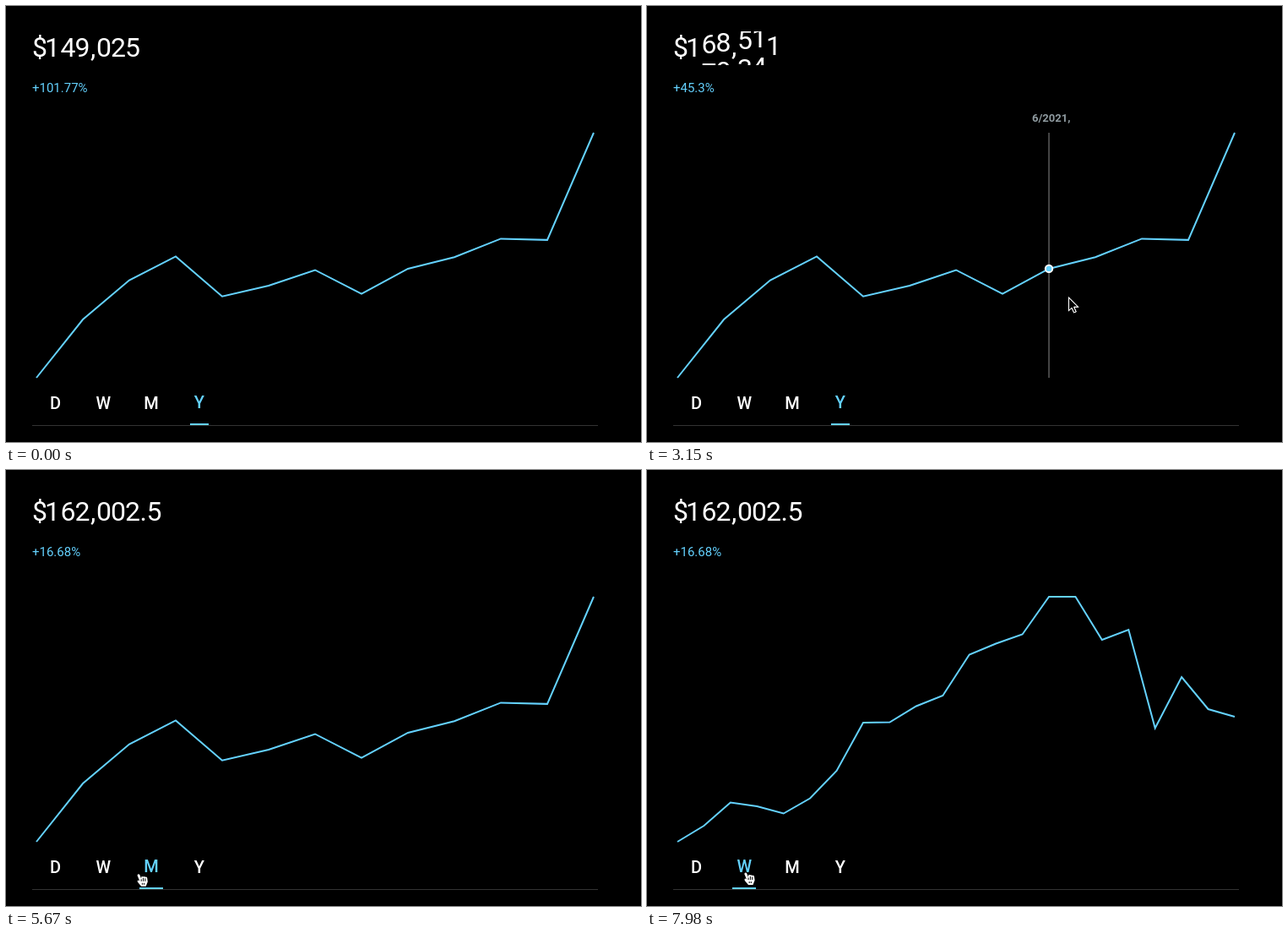
Animation, 752 px wide and 516 px high, one loop 8 s. Source, as an HTML page with a canvas:

```html
<!DOCTYPE html>
<html lang="en">
<head>
<meta charset="utf-8">
<title>Portfolio chart</title>
<style>
  html, body { margin: 0; height: 100%; overflow: hidden; background: #000; }
  canvas { display: block; }
</style>
</head>
<body>
<canvas id="stage" width="752" height="516"></canvas>
<script>
const ctx = document.getElementById('stage').getContext('2d');
const LOOP = 8000, TICK = 70;
const CYAN = '#64d2ff', WHITE = '#fff', FONT = 'Roboto, sans-serif';
const LEFT = 36, WIDTH = 660, TOP = 150, BOTTOM = 440;
const TOTAL_GAIN = 101.77, MONTH_GAIN = 16.68;
const DIGIT = 17, MARK = 8.5, ROW_HEIGHT = 34, BASELINE = 60;
const MORPH_START = 5670, MORPH_TIME = 1500;

// Chart data: yearly gains in percent from October 2020, monthly values in pixels
const yearGains = [0, 24.2, 40.5, 50.4, 33.8, 38.25, 44.75, 34.89, 45.3, 50.1, 57.75, 57.25, TOTAL_GAIN];
const monthHeights = [0, 19, 46.5, 42, 33.5, 51.5, 84, 141, 141.5, 160.5, 173,
  221.5, 234.5, 245.5, 290, 290, 239, 251, 134.5, 195, 157, 148];

const toPoints = heights => heights.map((h, i) =>
  [LEFT + WIDTH * i / (heights.length - 1), BOTTOM - h]);
const yearPoints = toPoints(yearGains.map(g => g / TOTAL_GAIN * (BOTTOM - TOP)));
const monthPoints = toPoints(monthHeights);

// The amount scrolls through these rows; rows without text get random digits
const rowTexts = {
  0: '49,025', 4: '29,920', 5: '20,118', 10: '02,102', 11: '12,400',
  13: '60,102.2', 14: '62,425.0', 15: '62,002.5'
};
// time, row, which of every three columns runs ahead
const rollKeys = [[1540, 0], [2450, 4, 1], [3850, 10, 0], [4620, 13, 1], [4830, 15]];

// time, x, y
const cursorKeys = [
  [770, 123, 39], [1400, 410, 443], [1540, 410, 443], [1680, 468, 455], [2450, 201, 313],
  [3185, 501, 345], [3850, 444, 337], [4480, 167, 476], [5110, 167, 476], [5460, 155, 478],
  [6510, 157, 476], [6860, 157, 476], [7350, 115, 476]
];

const arrow = new Path2D('M.5 .5V15.5L4 12.3L6.6 18L9 17L6.5 11.3H11.3Z');
const hand = new Path2D('M.3 2Q1.2-.3 3 1L5 6V3.8Q6.2 2.5 7.3 3.6Q8.5 2.6 9.6 4Q11.3 3.3 12 5L12.6 9.5L10.5 15H5L1 10.3Q-.3 8 1.7 7.6L3 8.5Z');
const fingers = new Path2D('M5 6.5V9M7.4 5V9M9.7 5.5V9M6.2 11V13M8.3 11V13');

const mix = (a, b, p) => a + (b - a) * p;
const linear = p => p;
const smooth = p => p * p * (3 - 2 * p);
const random = seed => Math.abs(Math.sin(seed * 127.1) * 43758.5) % 1;

function track(keys, t, easing) {
  const next = keys.findIndex(key => key[0] > t);
  if (next === 0) return keys[0].slice(1);
  if (next < 0) return keys[keys.length - 1].slice(1);
  const a = keys[next - 1], b = keys[next];
  const p = easing((t - a[0]) / (b[0] - a[0]));
  return a.slice(1).map((v, i) => mix(v, b[i + 1], p));
}

// CSS "ease": cubic-bezier(.25, .1, .25, 1)
function ease(x) {
  if (x <= 0) return 0;
  if (x >= 1) return 1;
  const bezier = (s, a, b) => 3 * (1 - s) ** 2 * s * a + 3 * (1 - s) * s * s * b + s ** 3;
  let low = 0, high = 1;
  for (let i = 0; i < 24; i++) {
    const mid = (low + high) / 2;
    if (bezier(mid, .25, .25) < x) low = mid; else high = mid;
  }
  return bezier(low, .1, 1);
}

function text(value, x, y, font, color, align = 'left') {
  ctx.font = `${font} ${FONT}`;
  ctx.fillStyle = color;
  ctx.textAlign = align;
  ctx.fillText(value, x, y);
}

function box(x, y, w, h, color) {
  ctx.fillStyle = color;
  ctx.fillRect(x, y, w, h);
}

function rowChar(row, column) {
  if (rowTexts[row]) return rowTexts[row][column] || '';
  if (column > 5) return '';
  return column === 2 ? ',' : String(Math.floor(random(row * 8 + column) * 10));
}

function rollPosition(t, column) {
  const lead = ahead => ahead === undefined ? 0
    : column % 3 === ahead ? Math.min(.6, .2 + column * .1) : .05;
  return track(rollKeys.map(([time, row, ahead]) => [time, row + lead(ahead)]), t, linear)[0];
}

function drawAmount(t) {
  const glyph = (char, x, y) => text(char, x, y, '400 32px', WHITE, 'center');
  glyph('$', 40, BASELINE);
  glyph('1', 55, BASELINE);
  ctx.save();
  ctx.beginPath();
  ctx.rect(62, 30, 140, 40);
  ctx.clip();
  let x = 65;
  [...rowTexts[15]].forEach((shape, column) => {
    const width = /\d/.test(shape) ? DIGIT : MARK;
    const position = rollPosition(t, column);
    const first = Math.floor(position);
    for (const row of [first, first + 1]) {
      glyph(rowChar(row, column), x + width / 2, BASELINE + (row - position) * ROW_HEIGHT);
    }
    x += width;
  });
  ctx.restore();
}

function drawTabs(active) {
  box(31, 496, 670, 1, '#333');
  [...'DWMY'].forEach((name, i) => {
    const x = 58.5 + i * 56.8, on = name === active;
    text(name, x, on ? 476 : 477, '500 20px', on ? CYAN : WHITE, 'center');
    const width = Math.round(ctx.measureText(name).width + 10);
    if (on) box(Math.round(x - width / 2), 494, width, 2, CYAN);
  });
}

function drawLine(t) {
  const p = ease((t - MORPH_START) / MORPH_TIME);
  const points = p === 0 ? yearPoints : monthPoints.map(([x, y], i) => {
    const from = yearPoints[Math.floor(i * yearPoints.length / monthPoints.length)];
    return [mix(from[0], x, p), mix(from[1], y, p)];
  });
  ctx.beginPath();
  points.forEach(([x, y]) => ctx.lineTo(x, y));
  ctx.strokeStyle = CYAN;
  ctx.lineWidth = 2;
  ctx.stroke();
}

function drawDot(x, y) {
  ctx.beginPath();
  ctx.arc(x, y, 4.2, 0, Math.PI * 2);
  ctx.fillStyle = CYAN;
  ctx.fill();
  ctx.strokeStyle = WHITE;
  ctx.lineWidth = 2;
  ctx.stroke();
}

function drawCursor(x, y, pointing) {
  const shape = pointing ? hand : arrow;
  ctx.save();
  ctx.translate(x, y);
  ctx.fillStyle = pointing ? WHITE : '#000';
  ctx.strokeStyle = pointing ? '#000' : WHITE;
  ctx.lineWidth = 1.2;
  ctx.stroke(shape);
  ctx.fill(shape);
  ctx.lineWidth = 1;
  ctx.stroke(pointing ? fingers : arrow);
  ctx.restore();
}

function draw(t) {
  const [x, y] = track(cursorKeys, t, smooth);
  const hovering = t > 1540 && y < BOTTOM;
  const index = Math.round((x - LEFT) / WIDTH * (yearGains.length - 1));
  const gain = hovering ? yearGains[index] : t < MORPH_START ? TOTAL_GAIN : MONTH_GAIN;

  box(0, 0, 752, 516, '#000');
  drawAmount(t);
  text(`+${gain}%`, 31, 102, '400 15px', CYAN);
  drawTabs(t < 5180 ? 'Y' : t < 7630 ? 'M' : 'W');

  if (hovering) {
    const [px] = yearPoints[index];
    const month = (index + 9) % 12 + 1;
    box(px - 1, TOP, 2, BOTTOM - TOP, '#444');
    text(`${month}/${index < 3 ? 2020 : 2021},`, px - 20, 137, '700 13px', '#8f9ba0');
  }
  drawLine(t);
  if (hovering) drawDot(...yearPoints[index]);

  const overTab = y > 455 && !(t > 6440 && t < 7140);
  if (t >= 770) drawCursor(x, y, overTab);
}

function frame(now) {
  draw(Math.floor(now % LOOP / TICK) * TICK);
  requestAnimationFrame(frame);
}
requestAnimationFrame(frame);
</script>
</body>
</html>
```
